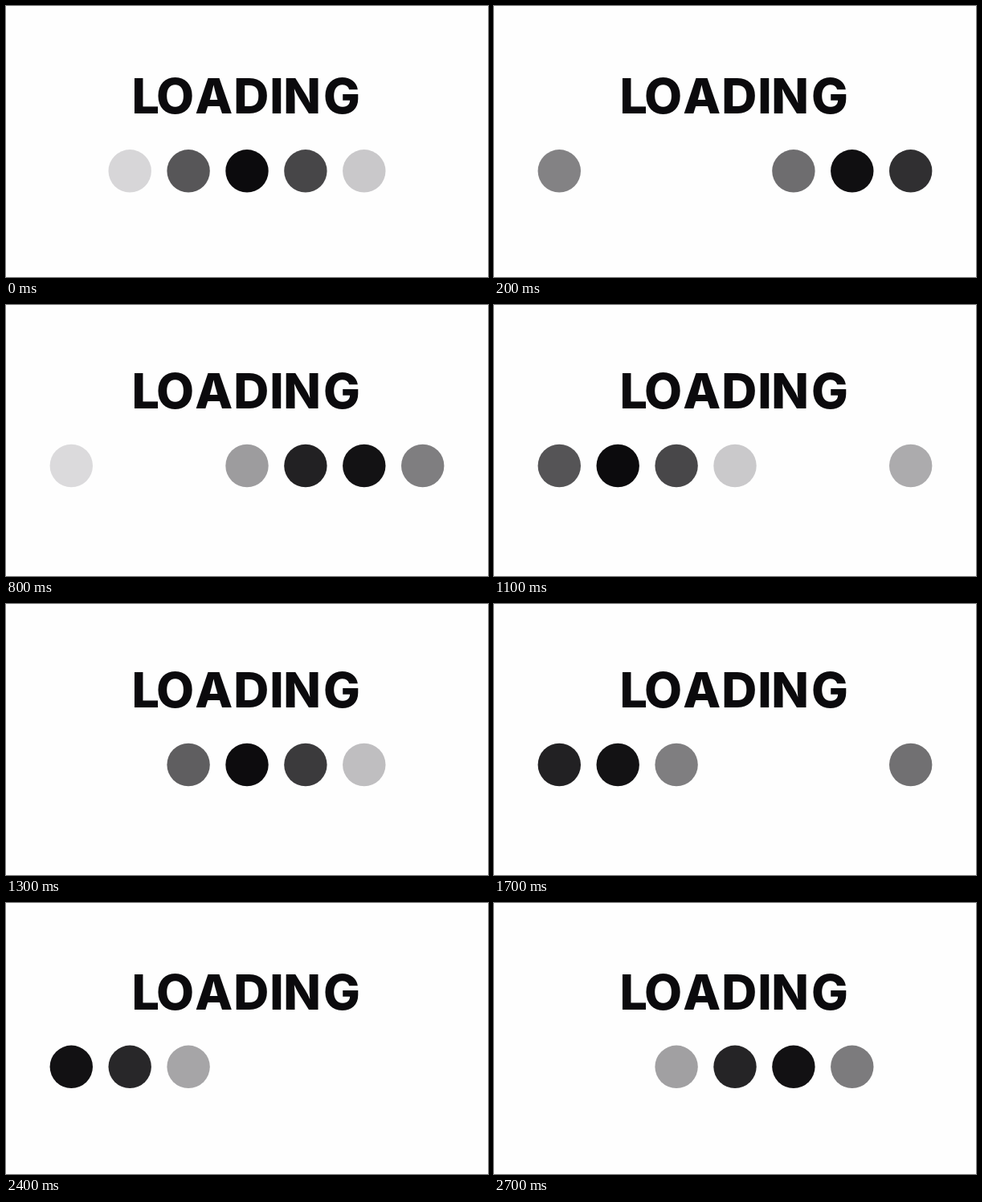
Animation, 600 px wide and 338 px high, one loop 2.8 s. Source, as an HTML page:

```html
<!DOCTYPE html>
<html lang="en">
<head>
<meta charset="utf-8">
<title>Loading</title>
<style>
  html, body { margin: 0; width: 100%; height: 100%; overflow: hidden; background: #fefefe; }
  svg { display: block; width: 100vw; height: 100vh; }
  text { font: 800 61px Inter, "Open Sans", sans-serif; fill: #0b0a0d; text-anchor: middle; }
</style>
</head>
<body>
<svg viewBox="0 0 600 338">
  <g id="scene">
    <text x="173.8 210.5 258.7 305.3 337 368.5 418" y="134.2">LOADING</text>
  </g>
</svg>
<script>
const LOOP = 2800, STEP = 100, PERIOD = 6.68, DOTS = 7;

// Start time, vertical offset, wave centre at start (null = no wave), dots per step, wraps around
const SEGMENTS = [
  [0, 0, 3.05, 1.1, true],
  [600, -5.3, 2.52, 1.04, true],
  [1800, -1.5, 1.64, 1.04, true],
  [2000, -1.5, null, 0, false],
  [2300, -1.5, -0.77, 1.1, false]
];

// Grey level by distance from the wave centre; farther dots are hidden
const SHADES = [
  [0, 11], [0.4, 19], [0.62, 36], [0.88, 59], [1.05, 87],
  [1.4, 127], [1.62, 160], [1.88, 191], [2.1, 222]
];

const scene = document.getElementById("scene");
const dots = Array.from({ length: DOTS }, (_, i) => {
  const dot = document.createElementNS("http://www.w3.org/2000/svg", "circle");
  dot.setAttribute("cx", 81.3 + i * 72.9);
  dot.setAttribute("cy", 205.8);
  dot.setAttribute("r", 26.7);
  scene.append(dot);
  return dot;
});

function shade(distance) {
  const i = SHADES.findIndex(([d]) => d > distance);
  if (i < 0) return null;
  const [d0, g0] = SHADES[i - 1], [d1, g1] = SHADES[i];
  return Math.round(g0 + (g1 - g0) * (distance - d0) / (d1 - d0));
}

function draw(now) {
  const t = Math.floor(now % LOOP / STEP) * STEP;
  const [start, dy, from, speed, wraps] = SEGMENTS.findLast(s => s[0] <= t);
  const centre = from + speed * (t - start) / STEP;
  scene.setAttribute("transform", `translate(0 ${dy})`);

  dots.forEach((dot, i) => {
    let d = i - centre;
    if (wraps) d -= PERIOD * Math.round(d / PERIOD);
    const g = from === null ? null : shade(Math.abs(d));
    dot.setAttribute("visibility", g === null ? "hidden" : "visible");
    if (g !== null) dot.setAttribute("fill", `rgb(${g}, ${g - 1}, ${g + 1})`);
  });
}

const origin = performance.now();
function tick() {
  draw(performance.now() - origin);
  requestAnimationFrame(tick);
}
tick();
</script>
</body>
</html>
```
